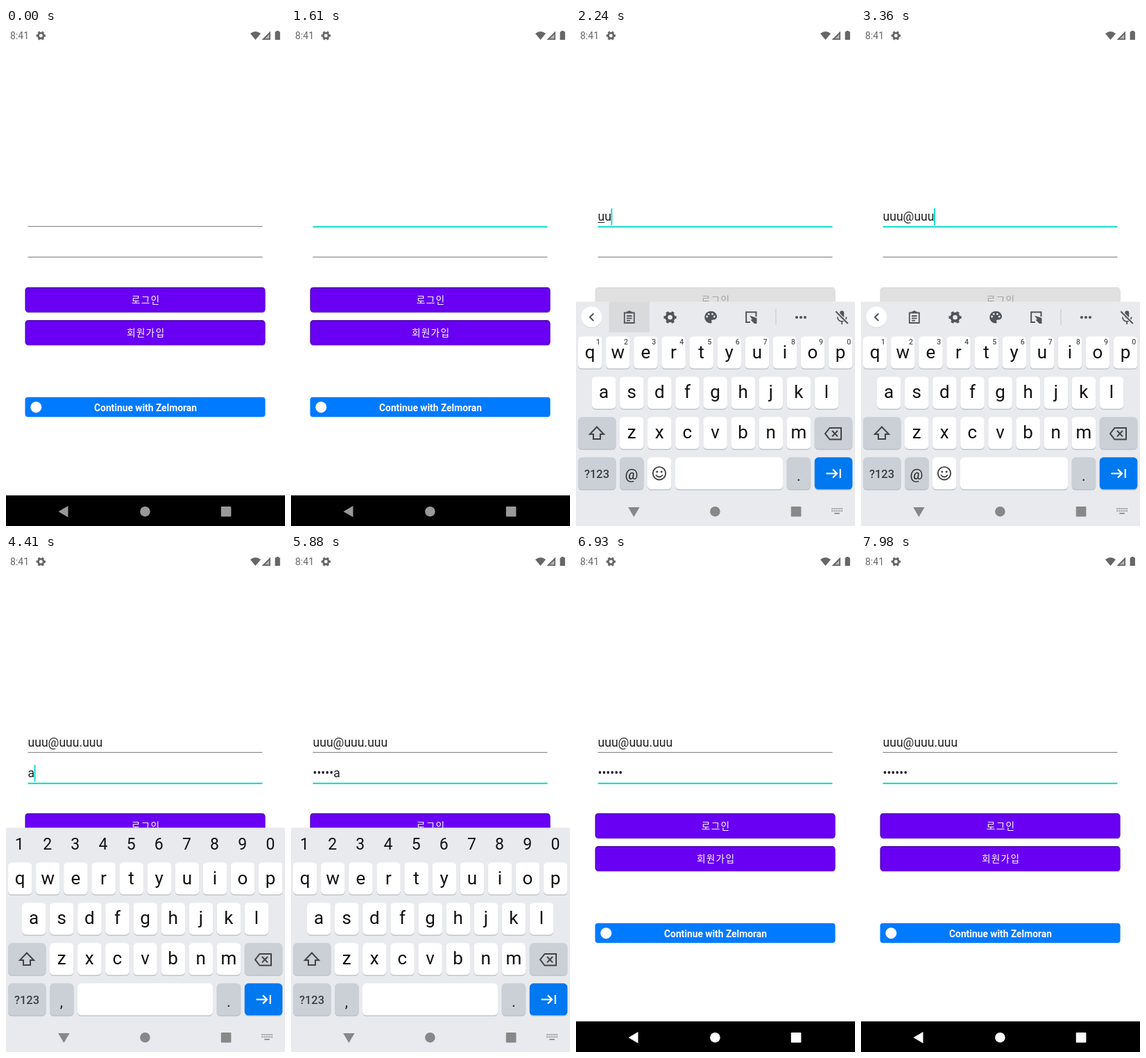
An HTML page for the animation above (8 s loop, 402 px wide and 716 px high).

```html
<!DOCTYPE html>
<html lang="ko">
<head>
<meta charset="utf-8">
<title>Login</title>
<style>
html, body { margin: 0; width: 100%; height: 100%; overflow: hidden; background: #fff; }
svg { display: block; width: 402px; height: 716px; font-family: Roboto, sans-serif; }
.ko { font: 13.7px "Noto Sans CJK KR", "Noto Sans CJK", sans-serif; letter-spacing: 1.22px; }
text { white-space: pre; }
</style>
</head>
<body>
<svg id="stage" viewBox="0 0 402 716"></svg>
<script>
const NS = 'http://www.w3.org/2000/svg';
const stage = document.getElementById('stage');
const LOOP = 8000;
const TEAL = '#08dcc8', PURPLE = '#6900f4', ICON = '#50555b', PANEL = '#e8eaee', GREY = '#cbd0d6';

function add(parent, tag, attrs = {}, text) {
  const node = document.createElementNS(NS, tag);
  for (const k in attrs) node.setAttribute(k, attrs[k]);
  if (text !== undefined) node.textContent = text;
  parent.appendChild(node);
  return node;
}
const group = (p, attrs) => add(p, 'g', attrs);
const rect = (p, x, y, width, height, fill, rx = 0) => add(p, 'rect', { x, y, width, height, fill, rx });
const disc = (p, cx, cy, r, fill) => add(p, 'circle', { cx, cy, r, fill });
const fillPath = (p, d, fill) => add(p, 'path', { d, fill });
const line = (p, d, stroke, w = 2) =>
  add(p, 'path', { d, stroke, fill: 'none', 'stroke-width': w });
const label = (p, x, y, s, size, fill, more = {}) =>
  add(p, 'text', { x, y, fill, 'font-size': size, 'text-anchor': 'middle', ...more }, s);
const show = (node, on) => node.setAttribute('display', on ? 'inline' : 'none');
const write = (node, s) => { if (node.textContent !== s) node.textContent = s; };
const clamp = v => Math.max(0, Math.min(1, v));
const ramp = (t, from, to) => clamp((t - from) / (to - from));
const easeOut = p => 1 - (1 - p) ** 3;
const count = (times, t) => times.filter(at => t >= at).length;

function gear(p, x, y, r, color) {
  const ring = { cx: x, cy: y, fill: 'none', stroke: color };
  add(p, 'circle', { ...ring, r: r * .57, 'stroke-width': r * .42 });
  add(p, 'circle', { ...ring, r: r * .84, 'stroke-width': r * .3, pathLength: 12,
    'stroke-dasharray': '1 1', 'stroke-dashoffset': .5 });
}

// Page
rect(stage, 0, 0, 402, 716, '#fff');
label(stage, 6, 16.3, '8:41', 14, '#686868', { 'text-anchor': 'start' });
gear(stage, 50.3, 11, 6.8, '#666');
fillPath(stage, 'M352 8 Q359.5 1.8 367 8 L359.5 17Z', '#666');
fillPath(stage, 'M381 4.5V17H368.5Z', '#666');
fillPath(stage, 'M379.3 9V15.3H373Z', '#b5b5b5');
fillPath(stage, 'M389.5 5.2V3.9h3.4v1.3h2v11.9h-7.3V5.2Z', '#666');

function field(y) {
  const g = group(stage);
  const text = label(g, 31.5, y - 8, '', 17.6, '#222', { 'text-anchor': 'start' });
  return {
    text,
    thin: rect(g, 31.5, y - .5, 338, 1, '#757575'),
    thick: rect(g, 31.5, y - .5, 338, 2, TEAL),
    caret: rect(g, 0, y - 26, 1.9, 24, TEAL)
  };
}
const mail = field(285.3), pass = field(329.3);
const under = rect(stage, 31.5, 279, 9.8, 1, '#222');

function button(y, s) {
  const shadow = rect(stage, 28, y + 1, 345.5, 36, '#c9c9c9', 4.5);
  const edge = rect(stage, 27.5, y - .2, 346, 35.7, '#4600a8', 4.5);
  const face = rect(stage, 28.8, y + 1.2, 344.4, 34.2, PURPLE, 3.5);
  return { shadow, edge, face, text: label(stage, 201.6, y + 22.5, s, 13.7, '#fff', { class: 'ko' }) };
}
const login = button(373, '로그인');
button(420.3, '회원가입');

const clip = add(stage, 'clipPath', { id: 'face' });
rect(clip, 28, 373, 345.5, 35.6, '#000', 4);
const ripple = add(stage, 'circle', { cx: 201, cy: 391, r: 0, fill: '#fff', 'clip-path': 'url(#face)' });

rect(stage, 28, 531.8, 345.5, 28, '#bcd3ee', 4);
rect(stage, 27.5, 530.8, 346, 28.3, '#007aff', 4);
disc(stage, 43.3, 545.2, 8, '#fff');
label(stage, 201, 550.8, 'Continue with Zelmoran', 13.8, '#fff', { 'font-weight': 700 });
rect(stage, 0, 672, 402, 44, '#000');

// Keyboard
const board = group(stage);
rect(board, 0, 393.5, 402, 400, PANEL);
const mailKeys = group(board), passKeys = group(board);

function key(p, x, y, w, fill = '#fff') {
  rect(p, x, y + 1.3, w, 46, '#b8bcc2', 5.5);
  rect(p, x, y, w, 46, fill, 5.5);
}

// Toolbar for the mail field
const tile = rect(mailKeys, 47.5, 393.5, 58.5, 44, '#d9dadb');
disc(mailKeys, 22.3, 416.5, 15, '#d2d4d8');
disc(mailKeys, 22.3, 415.5, 15, '#fff');
line(mailKeys, 'M25.3 410.5L20 415.7L25.3 421', ICON);
line(mailKeys, 'M69.8 409.5H83.8V424H69.8ZM73 414h7.6M73 417.3h7.6M73 420.6h5', ICON, 1.8);
fillPath(mailKeys, 'M73 410V407.5H75A2 2 0 0 1 78.6 407.5H80.6V410Z', ICON);
gear(mailKeys, 135.6, 416, 9.2, ICON);
fillPath(mailKeys, 'M194 407a8.8 8.8 0 0 0 0 17.6c2 0 2-1.8 1.4-2.6c-.8-1.4 0-2.6 1.4-2.6h1.8'
  + 'a4.6 4.6 0 0 0 4.5-4.6c0-4.4-4-7.8-9.1-7.8Z', ICON);
for (const [x, y] of [[188.7, 415], [191.3, 411.3], [196.5, 411.3], [199.3, 415]]) disc(mailKeys, x, y, 1.4, PANEL);
line(mailKeys, 'M251 423H245.2V408.6H259.5V415', ICON);
fillPath(mailKeys, 'M250 413.5L260.5 417V425H257L251.5 419.5L254 419Z', ICON);
rect(mailKeys, 287.5, 404, 1, 23, '#c3c6ca');
for (const x of [318, 324, 330]) disc(mailKeys, x, 416, 2.1, ICON);
rect(mailKeys, 380.2, 406.5, 6, 11.5, ICON, 3);
line(mailKeys, 'M376.8 415.5a6.4 6.4 0 0 0 12.8 0M383.2 422v4', ICON, 1.8);
line(mailKeys, 'M375 408L392 425', PANEL, 4);
line(mailKeys, 'M374.3 407.5L391.8 425', ICON, 1.9);

const letters = [];
[['qwertyuiop', 3, 443.5], ['asdfghjkl', 23, 501.4], ['zxcvbnm', 63, 559.3]].forEach(([row, x0, y]) => {
  [...row].forEach((c, i) => {
    const x = x0 + i * 40.1;
    key(board, x, y, 34.5);
    letters.push({ c, node: label(board, x + 17.2, y + 31, c, 26, '#111') });
  });
});
[...'1234567890'].forEach((d, i) => {
  const x = 19.5 + i * 40.15;
  label(mailKeys, x + 12.4, 454.8, d, 10.5, '#555', { 'font-weight': 500 });
  label(passKeys, x, 424.8, d, 23, '#111');
});
board.appendChild(mailKeys);

key(board, 3, 559.3, 54.5, GREY);
key(board, 343.8, 559.3, 54.5, GREY);
const shift = line(board, 'M30 573.5L40 584H35V591H25V584H20Z', '#444', 2);
const erase = line(board, 'M365.5 575H382V591.5H365.5L359 583.2ZM369 579l8 8.4M377 579l-8 8.4', '#444', 2);
key(board, 3, 617.3, 54.5, GREY);
label(board, 30, 646.5, '?123', 16.5, '#3c4043', { 'font-weight': 500 });
key(board, 303.7, 617.3, 34.5, GREY);
label(board, 321, 651, '.', 22, '#222');
key(board, 343.8, 617.3, 54.5, '#0078f0');
line(board, 'M360.5 640.5H376M370 634.5L376 640.5L370 646.5M380.8 634V647', '#fff', 2.2);

key(mailKeys, 63, 617.3, 34.5, GREY);
label(mailKeys, 80, 649, '@', 21, '#222');
key(mailKeys, 103, 617.3, 34.5);
add(mailKeys, 'circle', { cx: 120, cy: 640.3, r: 9.2, fill: 'none', stroke: '#444', 'stroke-width': 1.9 });
disc(mailKeys, 116.8, 638, 1.5, '#444');
disc(mailKeys, 123.2, 638, 1.5, '#444');
line(mailKeys, 'M115 642.5Q120 648.5 125 642.5', '#444', 1.9);
key(mailKeys, 143, 617.3, 155);
key(passKeys, 63, 617.3, 34.5, GREY);
label(passKeys, 80, 651, ',', 22, '#222');
key(passKeys, 103, 617.3, 195);

const mini = group(stage);
for (let i = 0; i < 12; i++) rect(mini, 368.3 + (i % 6) * 2.8, 690.3 + Math.floor(i / 6) * 3.2, 1.7, 1.7, '#888');
rect(mini, 372.3, 697, 7.5, 1.7, '#888');

// Navigation bar
const nav = group(stage);
const back = fillPath(nav, 'M75.5 695.2L89.5 687V703.4Z');
disc(nav, 200.4, 695.2, 7.3);
rect(nav, 309.8, 688, 14.6, 14.6, null, 1);
for (const node of nav.children) node.removeAttribute('fill');

const MAIL = 'uuu@uuu.uuu';
const mailAt = [2100, 2240, 2450, 2730, 3010, 3220, 3360, 3500, 3570, 3780, 3920];
const passAt = [4410, 4620, 4830, 5040, 5180, 5390];

function secret(t) {
  const n = count(passAt, t);
  if (!n) return '';
  return t >= 6930 ? '•'.repeat(n) : '•'.repeat(n - 1) + 'a';
}

function drawField(f, s, focus, caret) {
  write(f.text, s);
  show(f.thin, !focus);
  show(f.thick, focus);
  show(f.caret, caret);
  if (caret) f.caret.setAttribute('x', 31 + (s ? f.text.getComputedTextLength() : 0));
}

function draw(t) {
  const second = t >= 4130;
  const blink = t < 5880 || Math.floor((t - 5880) / 525) % 2 === 1;
  drawField(mail, MAIL.slice(0, count(mailAt, t)), t >= 1610 && !second, t >= 1680 && !second);
  drawField(pass, secret(t), second, second && blink);
  show(under, t >= 2100 && t < 2310);

  const off = t >= 2100 && t < 4410;
  login.face.setAttribute('fill', off ? '#e0e0e0' : PURPLE);
  login.edge.setAttribute('fill', off ? '#dcdcdc' : '#4600a8');
  login.text.setAttribute('fill', off ? '#a2a2a2' : '#fff');
  ripple.setAttribute('r', 30 + 160 * easeOut(ramp(t, 7210, 7450)));
  ripple.setAttribute('opacity', t < 7210 ? 0 : .22 * (1 - ramp(t, 7360, 7560)));

  const up = easeOut(ramp(t, 1650, 1930)) * (1 - ramp(t, 6160, 6400) ** 2);
  board.setAttribute('opacity', clamp(up * 1.3));
  board.setAttribute('transform', `translate(0 ${(1 - up) * 60})`);
  show(mailKeys, !second);
  show(passKeys, second);
  show(tile, t < 2310);
  const caps = t >= 2660 && t < 2870;
  for (const { c, node } of letters) write(node, caps ? c.toUpperCase() : c);
  shift.setAttribute('fill', caps ? '#444' : 'none');
  erase.setAttribute('opacity', t < 2100 || (second && t < 4410) ? .6 : 1);
  mini.setAttribute('opacity', up);

  const turn = ramp(t, 1610, 1890) - ramp(t, 6160, 6440);
  back.setAttribute('transform', `rotate(${-90 * turn} 83.4 695.2)`);
  const tone = t < 4000 ? 153 - 17 * ramp(t, 1610, 1960) : 136 + 119 * ramp(t, 6160, 6510);
  nav.setAttribute('fill', `rgb(${tone},${tone},${tone})`);
}

const start = performance.now();
function tick() {
  draw((performance.now() - start) % LOOP);
  requestAnimationFrame(tick);
}
tick();
</script>
</body>
</html>
```
